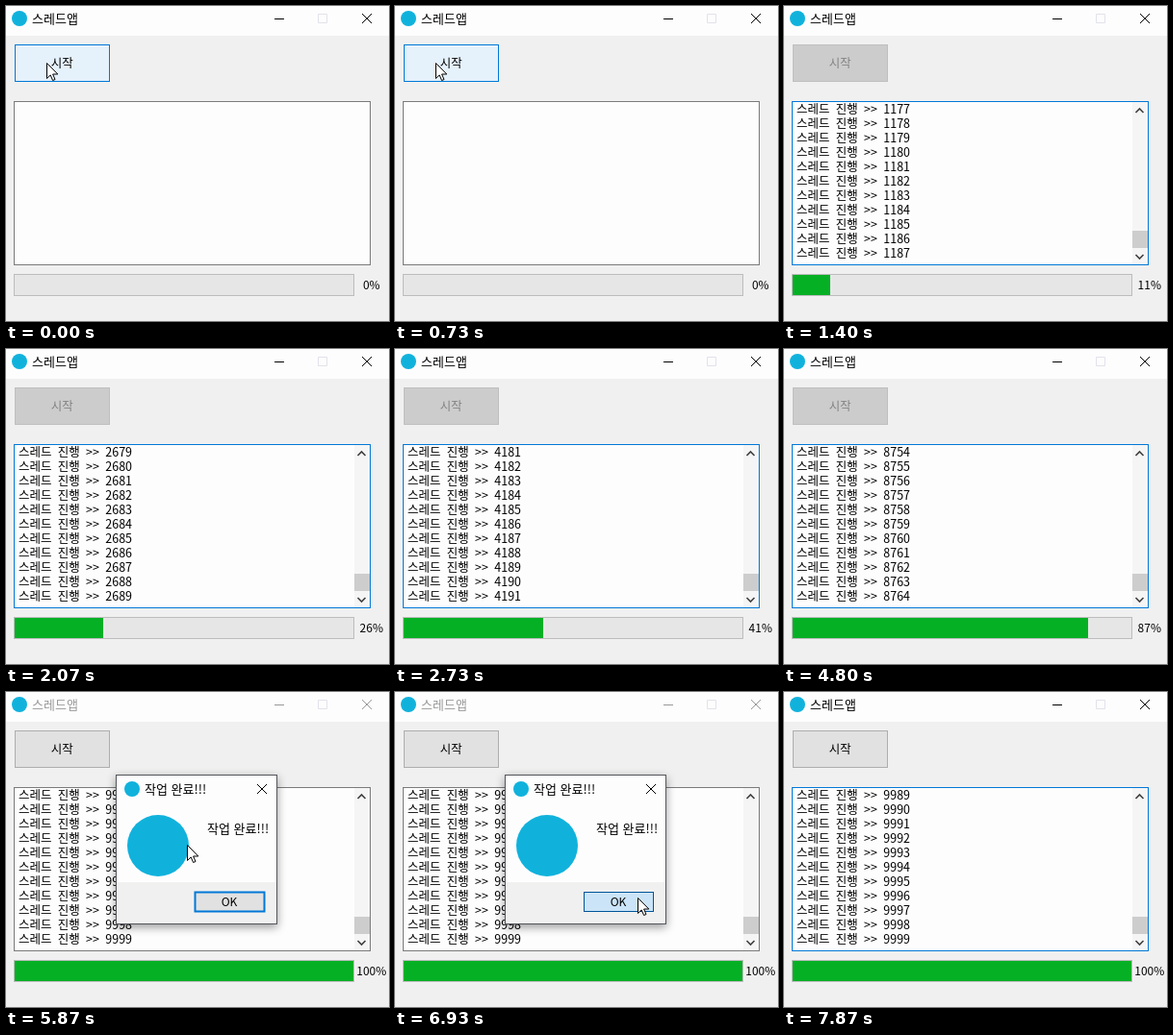
Recreate the animation shown at these times as an HTML page. Size 398x328 px, loop 7940 ms.

```html
<!DOCTYPE html>
<html lang="ko">
<head>
<meta charset="utf-8">
<style>
  html, body { margin: 0; width: 100%; height: 100%; overflow: hidden; background: #f0f0f0; }
  svg { display: block; width: 398px; height: 328px; }
  text { font: 13px "Noto Sans CJK KR", "Noto Sans CJK JP", "Noto Sans CJK SC", sans-serif; white-space: pre; }
  .small { font-size: 12px; text-anchor: middle; }
  #startText { font-size: 12.5px; text-anchor: middle; }
  #lines text { font-size: 12.5px; word-spacing: 2.8px; }
  #dialog .frame { filter: drop-shadow(0 3px 5px #0006); }
  .glyph { fill: none; stroke: #000; }
</style>
</head>
<body>
<svg viewBox="0 0 398 328">
  <rect width="398" height="328" fill="#f0f0f0"/>
  <rect width="398" height="31" fill="#fdfdfe"/>
  <circle cx="14" cy="13" r="8" fill="#10b2dc"/>
  <text id="caption" x="27" y="17.5">스레드앱</text>
  <path id="controls" fill="none" d="M279 13.5h10M370 8l10 10m0-10l-10 10"/>
  <path class="glyph" style="stroke:#e2e2ea" d="M324.5 8.5h9v9h-9z"/>

  <rect id="start" x="9.5" y="40.5" width="98" height="38"/>
  <text id="startText" x="58.3" y="63.5">시작</text>

  <rect id="box" x="8.5" y="99.5" width="370" height="170" fill="#fdfdfe"/>
  <g id="log">
    <g id="lines"></g>
    <rect x="362" y="100" width="16" height="169" fill="#f5f5f6"/>
    <rect id="thumb" x="362" width="16" fill="#cdcdcd"/>
    <path class="glyph" style="stroke:#404040;stroke-width:1.6" d="M365.5 111l4-4 4 4M365.5 259l4 4 4-4"/>
  </g>

  <rect x="8.5" y="279.5" width="353" height="22" fill="#e6e6e6" stroke="#bcbcbc"/>
  <rect id="bar" x="9" y="280" height="21" fill="#06b025"/>
  <text id="percent" class="small" x="379.8" y="295"></text>

  <g id="dialog">
    <rect class="frame" x="114.5" y="86.5" width="167" height="155" fill="#fdfdfe" stroke="#55565c"/>
    <rect x="115" y="198" width="166" height="43" fill="#f0f0f0"/>
    <circle cx="131" cy="101" r="8" fill="#10b2dc"/>
    <text x="144" y="105.5">작업 완료!!!</text>
    <path class="glyph" d="M261 96l10 10m0-10l-10 10"/>
    <circle cx="158" cy="160" r="32" fill="#10b2dc"/>
    <text x="209" y="147">작업 완료!!!</text>
    <rect id="ok" x="196.5" y="208.5" width="72" height="20"/>
    <text class="small" x="232" y="223">OK</text>
  </g>
  <path id="cursor" fill="#fff" stroke="#000" d="M.5.5v16l3.7-3.6 2.4 5.6 2.4-1-2.4-5.5h5.2z"/>
</svg>
<script>
const LOOP = 7940, TICK = 200 / 3;
const START = 870, DONE = 5360, CLOSE = 7050;
const ROWS = 11, PITCH = 15;
const COUNT = [[START, 0], [21 * TICK, 1187], [41 * TICK, 4191], [72 * TICK, 8764], [DONE, 9999]];
const PATH_X = [[930, 42], [1200, 150], [5400, 188], [6000, 188], [6650, 252]];
const PATH_Y = [[930, 59], [1200, 130], [5400, 159], [6000, 159], [6650, 214]];
// fill and border of each button state
const LOOK = {
  normal: ["#e1e1e1", "#adadad"],
  focus: ["#e1e1e1", "#0078d7"],
  hover: ["#e5f1fb", "#0078d7"],
  pressed: ["#cce4f7", "#005499"],
  disabled: ["#cccccc", "#bfbfbf"]
};

const $ = id => document.getElementById(id);
const set = (id, attrs) => {
  for (const k in attrs) $(id).setAttribute(k, attrs[k]);
};
const show = (id, on) => set(id, { visibility: on ? "visible" : "hidden" });
const paint = (id, state) => set(id, { fill: LOOK[state][0], stroke: LOOK[state][1] });

function along(keys, t) {
  if (t <= keys[0][0]) return keys[0][1];
  for (let i = 1; i < keys.length; i++) {
    const [t0, a] = keys[i - 1], [t1, b] = keys[i];
    if (t < t1) return a + (b - a) * (t - t0) / (t1 - t0);
  }
  return keys[keys.length - 1][1];
}

const rows = Array.from({ length: ROWS }, (_, i) => {
  const row = document.createElementNS("http://www.w3.org/2000/svg", "text");
  row.setAttribute("x", 13);
  row.setAttribute("y", 111.7 + i * PITCH);
  $("lines").append(row);
  return row;
});

function draw(time) {
  // the picture advances 15 times a second
  const t = Math.floor((time + 5) / TICK) * TICK;
  const running = t >= START && t < DONE;
  const modal = t >= DONE && t < CLOSE;
  const n = Math.round(along(COUNT, t));
  const pct = Math.floor((n + 1) / 100);

  const ink = modal ? "#999" : "#000";
  set("caption", { fill: ink });
  set("controls", { stroke: ink });

  paint("start", running ? "disabled" : t >= START ? "normal" : t >= 790 ? "pressed" : "hover");
  set("startText", { fill: running ? "#838383" : "#000" });
  set("box", { stroke: t >= START && !modal ? "#0078d7" : "#7a7a7a" });

  show("log", n > 0);
  const first = Math.max(0, n - ROWS + 1);
  rows.forEach((row, i) => {
    row.textContent = first + i <= n ? `스레드 진행 >> ${first + i}` : "";
  });
  const size = Math.max(18, 135 * ROWS / (n + 1));
  set("thumb", { y: 252 - size, height: size });

  set("bar", { width: Math.ceil(352 * pct / 100) });
  $("percent").textContent = pct + "%";

  show("dialog", modal);
  const okState = t >= 6860 ? "pressed" : t >= 6550 ? "hover" : "focus";
  paint("ok", okState);
  set("ok", { "stroke-width": okState === "focus" ? 2 : 1 });

  const x = Math.round(along(PATH_X, t)), y = Math.round(along(PATH_Y, t));
  set("cursor", { transform: `translate(${x} ${y})` });
  show("cursor", modal || t < DONE && y < 99);
}

const begin = performance.now();
function tick() {
  draw((performance.now() - begin) % LOOP);
  requestAnimationFrame(tick);
}
tick();
</script>
</body>
</html>
```
